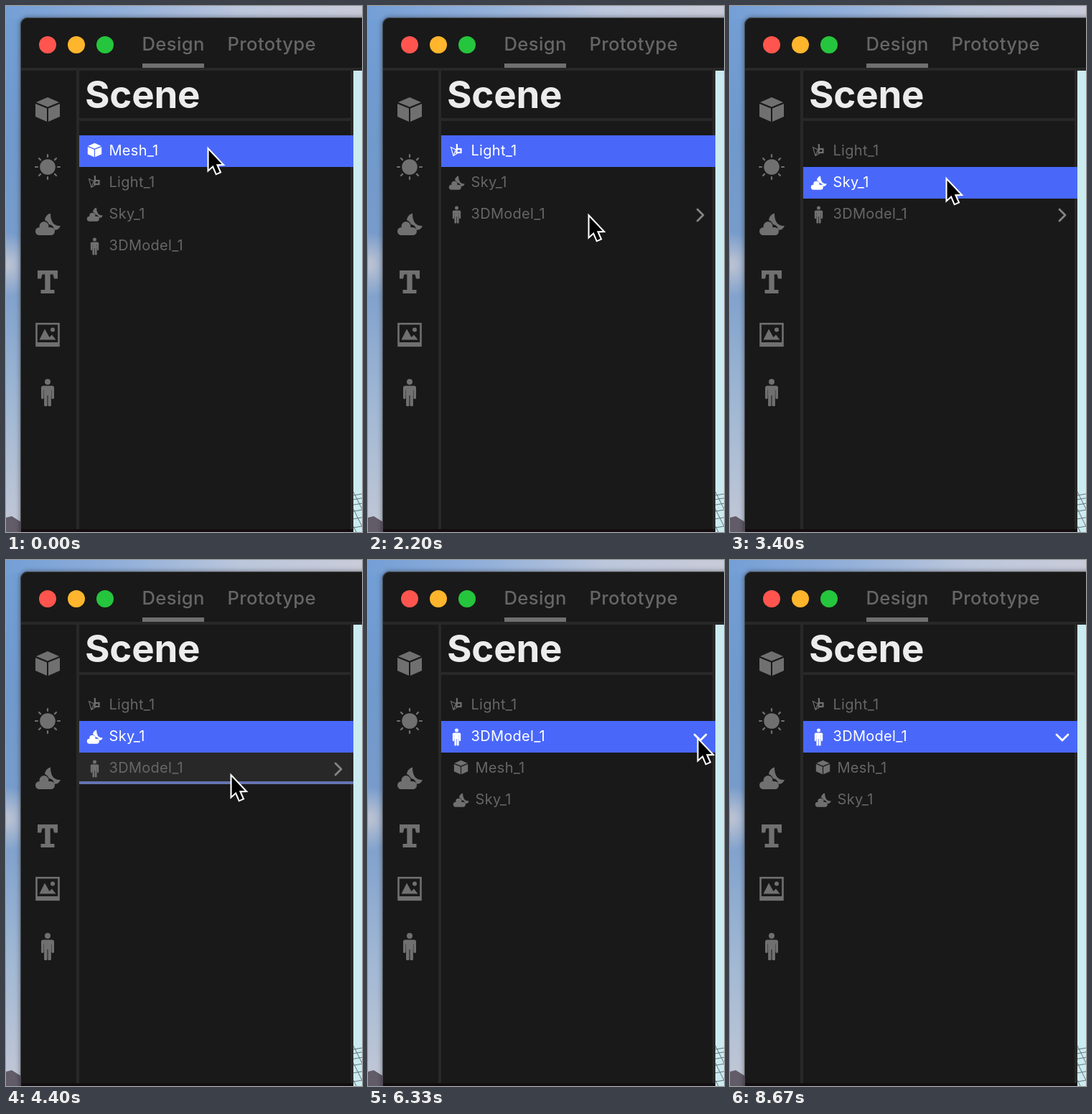
An HTML page with a canvas for the animation above (8.74 s loop, 496x732 px).

```html
<!DOCTYPE html>
<html lang="en">
<head>
<meta charset="utf-8">
<title>Scene list</title>
<style>
html, body { margin: 0; width: 100%; height: 100%; overflow: hidden; background: #191919; }
canvas { display: block; width: 496px; height: 732px; }
</style>
</head>
<body>
<canvas id="stage" width="496" height="732"></canvas>
<script>
const ctx = document.getElementById('stage').getContext('2d');
const LOOP = 8740, STEP = 200 / 3;
const ROW_TOP = 180, ROW_H = 44;
const FONT = 'Inter, "Liberation Sans", sans-serif';
const GRAY = '#666666', ICON = '#707070', BLUE = '#4968fa', DIVIDER = '#282828', PANEL = '#191919';
const MODEL = '3DModel_1';

function rect(x, y, w, h, color) {
  ctx.fillStyle = color;
  ctx.fillRect(x, y, w, h);
}

function disc(x, y, r) {
  ctx.beginPath();
  ctx.arc(x, y, r, 0, Math.PI * 2);
  ctx.fill();
}

function pill(x, y, w, h, r = Math.min(w, h) / 2) {
  ctx.beginPath();
  ctx.roundRect(x, y, w, h, r);
  ctx.fill();
}

function path(...points) {
  ctx.beginPath();
  points.forEach(([x, y]) => ctx.lineTo(x, y));
}

function poly(...points) {
  path(...points);
  ctx.fill();
}

function line(width, ...points) {
  ctx.lineWidth = width;
  path(...points);
  ctx.stroke();
}

function label(text, x, y, size, weight, color, spacing = 0.015) {
  ctx.font = `${weight} ${size}px ${FONT}`;
  ctx.letterSpacing = `${size * spacing}px`;
  ctx.fillStyle = color;
  ctx.fillText(text, x, y);
}

// Runs a drawing around its own centre in one colour.
function at(x, y, color, scale, draw) {
  ctx.save();
  ctx.translate(x, y);
  ctx.scale(scale, scale);
  ctx.fillStyle = ctx.strokeStyle = color;
  draw();
  ctx.restore();
}

const icons = {
  cube() {
    poly([0, -17], [16, -10], [0, -3.5], [-16, -10]);
    for (const s of [-1, 1]) poly([17 * s, -8], [s, -1.5], [s, 17], [17 * s, 10]);
  },
  sun() {
    disc(0, 0, 10.8);
    ctx.lineCap = 'round';
    for (let i = 0; i < 8; i++) {
      ctx.rotate(Math.PI / 4);
      line(2.2, [14, 0], [17, 0]);
    }
  },
  sky() {
    ctx.beginPath();
    ctx.moveTo(4, -16);
    ctx.quadraticCurveTo(4, 2, 18, 1.5);
    ctx.quadraticCurveTo(15, 8, 9.5, 7);
    ctx.quadraticCurveTo(8, 0, 2, -0.5);
    ctx.quadraticCurveTo(0, -5, -4, -6.5);
    ctx.quadraticCurveTo(-3, -14, 4, -16);
    ctx.fill();
    disc(-5, 2, 6.5);
    pill(-17, 3.5, 27, 11);
  },
  text() {
    ctx.fillRect(-14, -16, 28, 5.5);
    ctx.fillRect(-3.7, -16, 7.4, 32);
    ctx.fillRect(-9.5, 11, 19, 5);
    for (const s of [-1, 1]) poly([14 * s, -16], [14 * s, -4.5], [9 * s, -4.5], [7.5 * s, -11]);
  },
  image() {
    ctx.lineWidth = 2.6;
    ctx.strokeRect(-15.5, -15.3, 31, 30.6);
    ctx.fillRect(-15.5, 10.5, 31, 4);
    poly([-11.5, 7], [-4, -8], [2.5, 3.5], [6, 0], [11.5, 7]);
    disc(7, -7, 3);
  },
  person() {
    disc(0, -15, 4);
    pill(-9, -9.5, 18, 6);
    ctx.fillRect(-5, -8, 10, 12);
    for (const s of [-1, 1]) {
      pill(7.2 * s - 1.8, -8, 3.6, 17);
      pill(2.7 * s - 2.2, -2, 4.4, 21, 1.5);
    }
  },
  light() {
    line(1.1, [1, 4], [-4.5, 7.5], [-8, -4.5], [-1, -1], [-4.5, 7.5]);
    line(2.2, [0.3, -9], [0.6, 0]);
    ctx.strokeRect(0, -2, 6, 5);
  }
};

// Icon, vertical place in the row, and scale.
const items = {
  Mesh_1: ['cube', 20.5, 0.57],
  Light_1: ['light', 21, 1],
  Sky_1: ['sky', 22.5, 0.63],
  [MODEL]: ['person', 22.5, 0.63]
};

function select(scene, i) {
  scene.selected = i;
  scene.dragging = true;
}

function nest(scene) {
  scene.children.push(...scene.roots.splice(scene.selected, 1));
  scene.selected = 0;
  scene.dragging = false;
}

function expand(scene) {
  scene.selected = scene.roots.indexOf(MODEL);
  scene.open = true;
}

const actions = [
  [1330, nest],
  [2900, scene => select(scene, 1)],
  [4530, nest],
  [6060, expand]
];

function sceneAt(t) {
  const scene = { roots: Object.keys(items), children: [], open: false };
  select(scene, 0);
  for (const [time, act] of actions) if (t >= time) act(scene);
  scene.rows = scene.open ? [...scene.roots, ...scene.children] : scene.roots;
  return scene;
}

// Pointer moves: start, duration, destination.
const moves = [
  [70, 780, 307, 320],
  [1500, 600, 307, 290],
  [2270, 570, 301, 239],
  [3450, 780, 313, 298],
  [5300, 680, 459, 247],
  [7800, 750, 500, 90]
];

function pointerAt(t) {
  let x = 281, y = 197;
  for (const [start, duration, toX, toY] of moves) {
    const p = Math.min(1, Math.max(0, (t - start) / duration));
    const ease = p * p * (3 - 2 * p);
    x += (toX - x) * ease;
    y += (toY - y) * ease;
  }
  return [x, y];
}

function gradient(x, y, ...colors) {
  const g = ctx.createLinearGradient(0, 0, x, y);
  colors.forEach((c, i) => g.addColorStop(i / (colors.length - 1), c));
  return g;
}

function drawDesktop() {
  rect(0, 0, 496, 732, gradient(0, 732, '#729fd6', '#7099cc', '#7a9dcb', '#9fb7d4', '#c3c8d6'));
  const cloud = ctx.createRadialGradient(0, 360, 5, 0, 360, 45);
  cloud.addColorStop(0, 'rgba(196,200,212,0.85)');
  cloud.addColorStop(1, 'rgba(196,200,212,0)');
  rect(0, 310, 20, 100, cloud);
  rect(0, 0, 496, 18, gradient(496, 0, '#749fd6', '#93b0da', '#bcc7dc', '#c9cbd9'));
  ctx.fillStyle = '#625b68';
  poly([0, 712], [8, 710], [24, 720], [24, 732], [0, 732]);
}

function drawViewport() {
  rect(484, 90, 12, 642, '#cbebf0');
  ctx.strokeStyle = '#65757b';
  for (let i = 0; i < 6; i++) {
    const y = 681 + i * 5 + i * i * 0.8;
    line(1, [484, y], [496, y - 2]);
  }
  for (let y = 652; y < 732; y += 24) line(1, [484, y + 24], [496, y + 48]);
}

function drawWindow() {
  ctx.save();
  ctx.shadowColor = 'rgba(0,0,0,0.45)';
  ctx.shadowBlur = 7;
  ctx.fillStyle = PANEL;
  pill(20, 16, 500, 740, 10);
  ctx.restore();
  ctx.strokeStyle = '#4b4c4e';
  ctx.lineWidth = 1;
  ctx.beginPath();
  ctx.roundRect(20.5, 16.5, 500, 740, 10);
  ctx.stroke();

  ['#ff554e', '#ffb52c', '#25c53d'].forEach((color, i) => {
    ctx.fillStyle = color;
    disc(58 + 40 * i, 54, 12);
  });
  label('Design', 189.5, 62, 25.6, 500, GRAY);
  label('Prototype', 308.5, 62, 25.6, 500, GRAY);
  rect(190, 80, 86, 6, ICON);

  rect(21, 86, 475, 4, DIVIDER);
  rect(102, 156, 378, 4, DIVIDER);
  for (const x of [98, 480]) rect(x, 90, 4, 642, DIVIDER);
  label('Scene', 110, 142, 52.8, 700, '#ececec', -0.004);
  drawViewport();
  rect(21, 728, 463, 4, '#130d10');

  const tools = { cube: 144, sun: 224, sky: 304.5, text: 384, image: 457.5, person: 538 };
  for (const name in tools) at(58, tools[name], ICON, 1, icons[name]);
}

function drawChevron(y, open) {
  at(463, y, open ? '#ffffff' : '#858585', 1, () => {
    if (open) ctx.rotate(Math.PI / 2);
    ctx.lineCap = ctx.lineJoin = 'round';
    line(2.8, [-4, -8], [4, 0], [-4, 8]);
  });
}

function drawRow(scene, name, i) {
  const [icon, dy, scale] = items[name];
  const y = ROW_TOP + i * ROW_H, selected = i === scene.selected;
  const indent = i >= scene.roots.length ? 6 : 0;
  if (selected) rect(102, y, 382, ROW_H, BLUE);
  at(123.5 + indent, y + dy, selected ? '#ffffff' : ICON, scale, icons[icon]);
  label(name, 143.5 + indent, y + 28, 20, 400, selected ? '#ffffff' : GRAY);
  if (name === MODEL && scene.children.length) drawChevron(y + 23, scene.open);
}

function drawDropTarget(scene, pointerY) {
  const i = Math.floor((pointerY - ROW_TOP) / ROW_H);
  if (!scene.dragging || i === scene.selected || !scene.rows[i]) return;
  const y = ROW_TOP + i * ROW_H;
  rect(102, y, 378, ROW_H, '#282828');
  rect(102, y + 40, 382, 4, '#6574b0');
}

function drawPointer(x, y) {
  at(x, y, '#ffffff', 1.04, () => {
    path([1.5, 3.6], [1.5, 29], [7.2, 23.8], [11.8, 34.5], [16, 32.7], [11.4, 22.4], [19, 22.2]);
    ctx.closePath();
    ctx.lineWidth = 4;
    ctx.stroke();
    ctx.fillStyle = '#000000';
    ctx.fill();
  });
}

function draw(now) {
  const t = Math.floor((now % LOOP + 5) / STEP) * STEP;
  const scene = sceneAt(t);
  const [x, y] = pointerAt(t);
  drawDesktop();
  drawWindow();
  drawDropTarget(scene, y);
  scene.rows.forEach((name, i) => drawRow(scene, name, i));
  drawPointer(x, y);
}

const start = performance.now();
function tick() {
  draw(performance.now() - start);
  requestAnimationFrame(tick);
}
tick();
</script>
</body>
</html>
```
